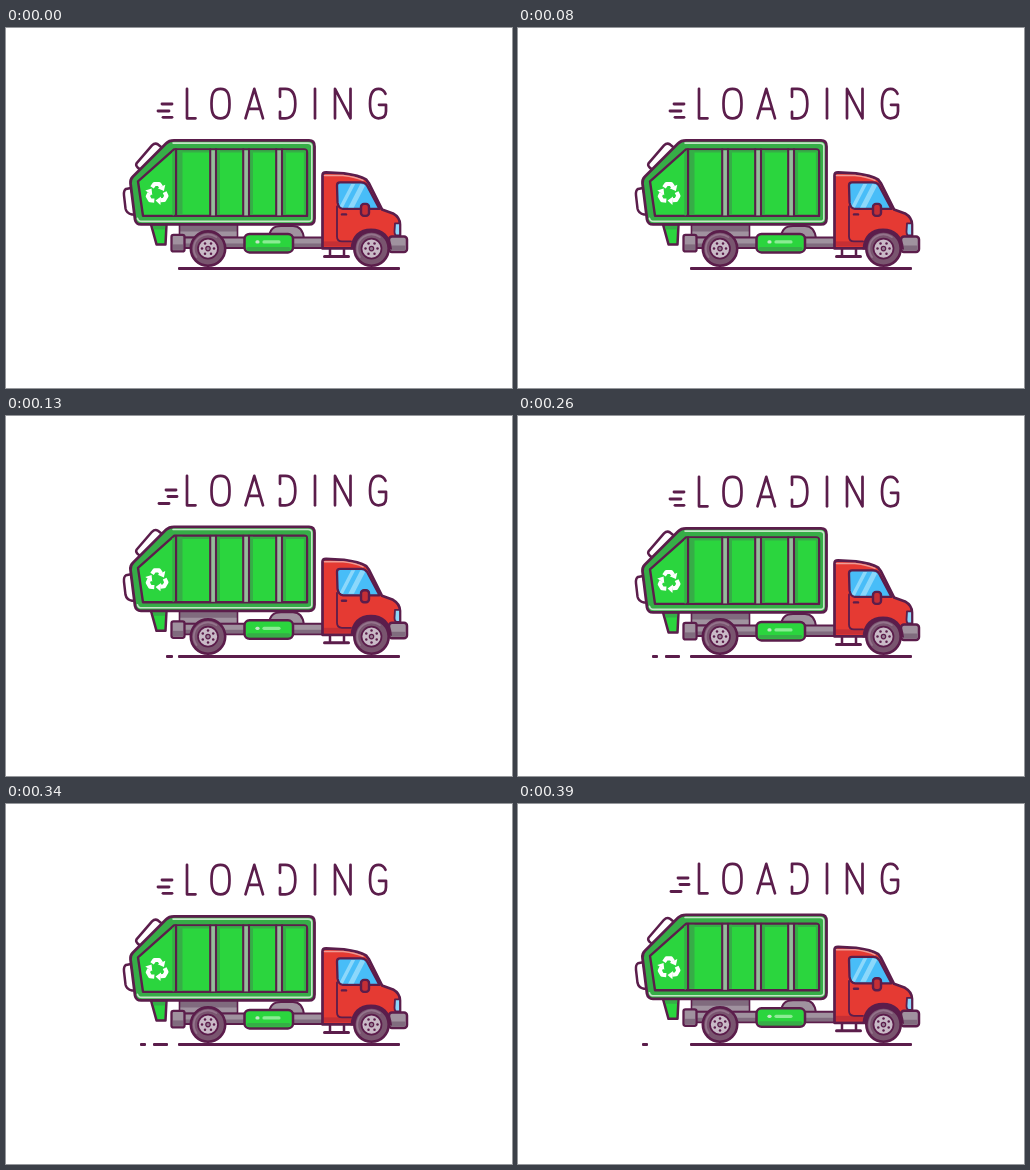
Animation, 506 px wide and 360 px high, one loop 0.52 s. Source, as an HTML page with a canvas:

```html
<!DOCTYPE html>
<html lang="en">
<head>
<meta charset="utf-8">
<title>Loading</title>
<style>
html, body { margin: 0; width: 100%; height: 100%; overflow: hidden; background: #fff; }
canvas { display: block; width: 506px; height: 360px; }
</style>
</head>
<body>
<canvas id="stage" width="506" height="360" role="img" aria-label="LOADING"></canvas>
<script>
const ctx = document.getElementById('stage').getContext('2d');
const STEP = 130;
const INK = '#5b1d4b', GREEN = '#2bd53e', SHADE = '#36ad47', LIGHT = '#c3e6c6';
const RED = '#e53a33', DARK_RED = '#c52f35', GREY = '#a0929f', DARK_GREY = '#806b7e';
const SKY = '#48bdf8', PALE_SKY = '#8cd8fb';

// Road dashes left behind the truck, one set per step: [start, end]
const DASHES = [[], [[160, 167]], [[134, 140], [147, 162]], [[124, 130]]];
// Speed lines by the lettering: [start, end, y]
const SPEED = [
  [[156, 166, 76], [152, 163, 83], [157, 166, 89.3]],
  [[160, 170, 74], [162, 171, 80.5], [153, 163, 87.5]]
];
const LETTERS = [
  'M181 60V89.5H189.5',
  'M214.5 60C207.5 60 205.5 65 205.5 75S207.5 89.5 214.5 89.5S223.5 85 223.5 75S221.5 60 214.5 60Z',
  'M239.5 89.5L248.3 60L257 89.5M243 80H254',
  'M274 68V60H279.5C287 60 289.3 66 289.3 75S287 89.5 279.5 89.5H274V83',
  'M309 60V89.5',
  'M329 89.5V60L344.5 89.5V60',
  'M379.5 65C378 61.5 375.5 60 372.5 60C366 60 364 66 364 75S366 89.5 372.5 89.5C378 89.5 380 86.5 380 82.5V76H373'
];

function shape(d, fill, stroke, width = 2.5) {
  const path = new Path2D(d);
  if (fill) { ctx.fillStyle = fill; ctx.fill(path); }
  if (stroke) { ctx.strokeStyle = stroke; ctx.lineWidth = width; ctx.stroke(path); }
}

function box(x, y, w, h, r, fill, stroke, width = 2.5) {
  ctx.beginPath();
  ctx.roundRect(x, y, w, h, r);
  if (fill) { ctx.fillStyle = fill; ctx.fill(); }
  if (stroke) { ctx.strokeStyle = stroke; ctx.lineWidth = width; ctx.stroke(); }
}

function disc(x, y, r, fill, stroke, width = 2) {
  ctx.beginPath();
  ctx.arc(x, y, r, 0, Math.PI * 2);
  ctx.fillStyle = fill;
  ctx.fill();
  if (stroke) { ctx.strokeStyle = stroke; ctx.lineWidth = width; ctx.stroke(); }
}

function line(x1, y1, x2, y2, color = INK, width = 2.5) {
  shape(`M${x1} ${y1}L${x2} ${y2}`, null, color, width);
}

function lettering(bob) {
  ctx.save();
  ctx.translate(0, 0.8 - bob);
  LETTERS.forEach(d => shape(d, null, INK, 2.7));
  ctx.restore();
  SPEED[bob].forEach(([a, b, y]) => line(a, y, b, y, INK, 2.8));
}

function recycle(x, y) {
  ctx.save();
  ctx.translate(x, y);
  ctx.scale(1.15, 1.15);
  ctx.lineCap = 'butt';
  for (let i = 0; i < 3; i++) {
    shape('M-4.3 -5.2L-2.2 -8.2H1.8L3.6 -5.6', null, '#fff', 3.6);
    shape('M0.6 -4.4L7.2 -7.6L6 -2Z', '#fff');
    ctx.rotate(Math.PI * 2 / 3);
  }
  ctx.restore();
}

function chassis() {
  box(173.5, 195, 58, 14, 1, DARK_GREY, INK, 1.6);
  box(174.5, 203, 56, 5, 0, GREY);
  shape('M262.5 210C264 200 268 197.5 275 197.5H287C294 197.5 297 202 298 210Z', GREY, INK, 2);
  box(170, 209, 148, 10.5, 1, GREY, INK, 2);
  box(171, 215, 146, 3.5, 0, DARK_GREY);
  box(165.5, 206.5, 13, 16.5, 2, GREY, INK, 2.3);
  box(167, 216, 10, 5.5, 0, DARK_GREY);
  box(238.5, 205.5, 48.5, 18.5, 5, GREEN, INK);
  box(240.5, 218.5, 44, 3.8, 2, SHADE);
  line(251, 213.5, 252, 213.5, LIGHT, 3.2);
  line(258, 213.5, 273, 213.5, '#8aec94', 3.2);
}

function container() {
  // Rear handles and chute
  shape('M130.5 135L146 117Q149 114 152 116L157 120L137 141Q134 142 131.5 139Q129.5 137 130.5 135Z', '#fff', INK);
  shape('M125 159.5L120 160.5Q117.5 162 118 167L119.5 180Q120.5 185 126 186L131 186Z', '#fff', INK);
  shape('M145 196H160.5L159.5 216H150.5Z', GREEN, INK);
  shape('M146.5 197H159.3L159 201H148Z', SHADE);

  shape('M168 112H303Q308.5 112 308.5 118V190Q308.5 196 303 196H135Q130 196 129 191L124.5 155Q124 151 127 148L160 115Q163 112 168 112Z', SHADE, INK, 2.8);
  shape('M167 114.7H302Q305.8 114.7 305.8 118V190Q305.8 193 302 193H136Q132 193 131.5 190', null, LIGHT, 1.6);
  shape('M168 121H298Q301 121 301 124V187.5H137L132 153Z', GREEN, INK, 2.4);
  shape('M169 123H299', null, SHADE, 2.2);
  box(171, 122, 5.5, 64, 0, SHADE);
  line(167.3, 124, 167.3, 186, SHADE, 2);
  line(170, 121, 170, 187, INK, 2.3);
  [203, 236, 269].forEach(x => {
    box(x + 7, 122, 4, 64, 0, SHADE);
    box(x + 1, 122, 6, 65, 0, '#94bd9a');
    line(x + 1.2, 121, x + 1.2, 187, INK, 2.1);
    line(x + 7, 121, x + 7, 187, INK, 2.1);
  });
  line(298.8, 124, 298.8, 185, SHADE, 1.8);
  recycle(151, 165);
}

function cab() {
  line(324, 220, 324, 228, INK, 2.5);
  line(338, 220, 338, 228, INK, 2.5);
  line(318.5, 228, 342.5, 228, INK, 3);
  shape('M316.5 147Q316.5 144 320 144L338 145Q353 147 360 151L363 155L376 181L387 185Q394 189 394 196V220H316.5Z', RED, INK, 2.7);
  shape('M318.5 147H337Q350 148.5 357 152', null, '#ee9d96', 1.5);
  box(318, 213, 30, 5, 0, DARK_RED);
  shape('M331 157Q331 154 334 154H355Q359 154 361 157L373.5 180.5H337Q332.5 180 331.5 174Z', SKY, INK, 2.3);
  ctx.save();
  ctx.clip(new Path2D('M332.5 155.5H355Q358 155.5 360 158L371 179H336Q333 178 333 174Z'));
  line(334, 181, 348, 154, PALE_SKY, 3.5);
  line(343, 183, 359, 152, PALE_SKY, 5);
  ctx.restore();
  shape('M331 178V208Q331 213 336 213H345', null, INK, 1.8);
  line(336, 186, 340, 186, INK, 2.4);
  box(355, 175.5, 8, 12, 3, DARK_RED, INK, 2.4);
  shape('M389 195H394V207H391Q388.5 207 388.5 203Z', PALE_SKY, INK, 1.8);
  box(383, 208, 18, 15.5, 3, GREY, INK);
  box(385, 217, 14.5, 5, 1, DARK_GREY);
  // Wheel arch
  shape('M344.5 221C345 207 353 200 365 200S385 207 386 221Z', INK);
}

function wheel(x, y, turn) {
  disc(x, y, 17.2, '#79556f', INK, 2.6);
  ctx.beginPath();
  ctx.arc(x, y, 14.2, Math.PI * 0.8, Math.PI * 1.7);
  ctx.strokeStyle = '#94748c';
  ctx.lineWidth = 1.8;
  ctx.stroke();
  disc(x, y, 10, '#c9bac7', INK, 1.7);
  for (let i = 0; i < 6; i++) {
    const a = turn + i * Math.PI / 3;
    disc(x + Math.cos(a) * 6, y + Math.sin(a) * 6, 1.25, INK);
  }
  disc(x, y, 2.2, '#9a8397', INK, 1.2);
}

function road(a, b) {
  box(a, 239, b - a, 3, 1, INK);
}

function draw(step) {
  const bob = step % 2;
  ctx.fillStyle = '#fff';
  ctx.fillRect(0, 0, 506, 360);
  ctx.lineCap = ctx.lineJoin = 'round';

  lettering(bob);
  ctx.save();
  ctx.translate(0, 0.4 - bob * 1.6);
  chassis();
  container();
  cab();
  ctx.restore();

  road(172, 394);
  DASHES[step].forEach(([a, b]) => road(a, b));
  wheel(202, 220.6, bob * Math.PI / 6);
  wheel(365.5, 220.6, bob * Math.PI / 6);
}

const start = performance.now();
function tick() {
  draw(Math.floor((performance.now() - start) / STEP) % 4);
  requestAnimationFrame(tick);
}
tick();
</script>
</body>
</html>
```
